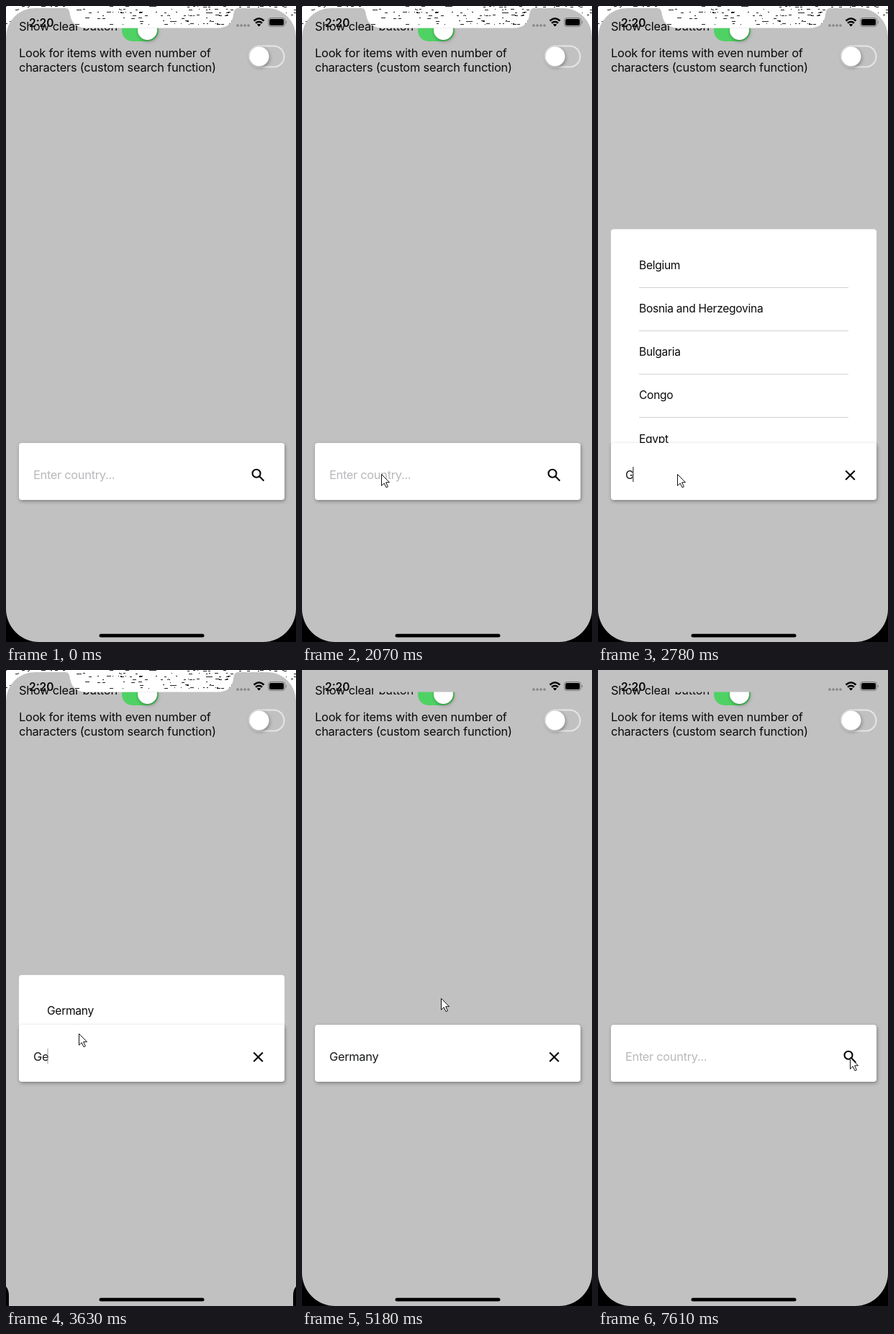
Write an HTML page that moves like this. It is 403 by 882 pixels and loops after 8 s.

```html
<!DOCTYPE html>
<html lang="en">
<head>
<meta charset="utf-8">
<title>Country autocomplete</title>
<style>
  html, body { margin: 0; width: 100%; height: 100%; overflow: hidden; background: #c1c1c1; }
  svg { display: block; width: 403px; height: 882px; }
  text { font: 16.4px Inter, sans-serif; letter-spacing: -.22px; fill: #0a0a0a; white-space: pre; }
  #value { letter-spacing: -.3px; }
  .row { font-size: 15.6px; letter-spacing: -.3px; }
  .clock { font-size: 15.5px; font-weight: 600; letter-spacing: 0; }
  .soft { filter: drop-shadow(1px 2px 2.5px rgba(0, 0, 0, .34)); }
</style>
</head>
<body>
<svg viewBox="0 0 403 882">
  <defs><clipPath id="bezelClip"><use href="#bezelShape"/></clipPath></defs>
  <rect width="403" height="882" fill="#c1c1c1"/>

  <text x="18" y="34">Show clear button</text>
  <rect x="161" y="19" width="51" height="30" rx="15" fill="#4fd264"/>
  <circle class="soft" cx="196.5" cy="33.5" r="13.5" fill="#fff"/>
  <rect x="99" width="219" height="30.5" fill="#c1c1c1"/>

  <text x="18" y="71">Look for items with even number of</text>
  <text x="18" y="91">characters (custom search function)</text>
  <rect x="338" y="55.5" width="48.5" height="29" rx="14.5" fill="none" stroke="#e6e6e6" stroke-width="2"/>
  <circle class="soft" cx="352" cy="70" r="13.5" fill="#fff"/>

  <g id="bezel">
    <path id="bezelShape" fill="#fff" d="M0 0H403V43A40 40 0 0 0 363 3H322Q317 3 316 12Q314 30.5 294 30.5H112Q92 30.5 89 12Q88 3 83 3H40A40 40 0 0 0 0 43Z"/>
    <path id="specks" clip-path="url(#bezelClip)" stroke="#222" fill="none"/>
  </g>

  <text class="clock" x="32" y="28.5">2:20</text>
  <path d="M322 27h17" stroke="#858585" stroke-width="3.6" stroke-linecap="round" stroke-dasharray="0 5"/>
  <g fill="none" stroke="#080808" stroke-width="2.5">
    <path d="M344.5 20.5Q351.5 14 358.5 20.5"/>
    <path d="M347 23.7Q351.5 19.8 356 23.7"/>
  </g>
  <path d="M348.8 25.8Q351.5 23.6 354.2 25.8L351.5 28.6Z"/>
  <rect x="364.5" y="16.5" width="23" height="12" rx="3.5" fill="none" stroke="#777"/>
  <rect x="366" y="18" width="20" height="9" rx="2"/>
  <path d="M389 20.5q2 2 0 4z" fill="#666"/>

  <g id="list"></g>

  <g id="field">
    <rect class="soft" x="18" width="369" height="79" rx="4" fill="#fff"/>
    <text id="value" x="38" y="49.5"></text>
    <rect id="caret" y="33" width="2" height="21" fill="#858585"/>
    <rect id="press" x="338" y="32.5" width="24" height="24" fill="#ddd"/>
    <path id="icon" transform="translate(338.5 32.7)" fill="none" stroke="#080808" stroke-width="2.1"/>
  </g>

  <path id="corner"/>
  <use href="#corner" transform="matrix(-1 0 0 1 403 0)"/>
  <rect x="129.5" y="870.8" width="146" height="4.8" rx="2.4"/>
  <path id="cursor" d="M.5 .5V16.2L4.2 12.7 7 18.7 9.4 17.7 6.7 11.7H11.5Z" fill="#fff" stroke="#111"/>
</svg>

<script>
const LOOP = 8000, TICK = 76;
const FOCUS = 1140, TYPE_G = 2150, TYPE_E = 2850, PICK = 4170, CLOSE = 4245, FILL = 4400, PRESS = 6760, CLEAR = 7610;

const $ = id => document.getElementById(id);
const show = (id, on) => $(id).style.display = on ? '' : 'none';
const clamp = v => Math.max(0, Math.min(1, v));

const SEARCH = 'M15 9.5a5.5 5.5 0 1 0-11 0a5.5 5.5 0 1 0 11 0M13.4 13.4L19.8 19.8';
const CROSS = 'M5.7 5.7L18.3 18.3M18.3 5.7L5.7 18.3';
const ROUND_CORNER = 'M0 836A46 46 0 0 0 46 882H0Z';
const SLIVER_CORNER = 'M0 855Q4 859 4 868V882H0Z';

// Each move starts where the previous one ends; bow bends the path sideways.
const MOVES = [
  { start: 380, end: 910, x: 110, y: 649, bow: 0 },
  { start: 3310, end: 4020, x: 96, y: 473, bow: -.05 },
  { start: 5030, end: 5800, x: 328, y: 504, bow: .27 },
  { start: 5880, end: 6120, x: 356, y: 537, bow: -.3 },
  { start: 6290, end: 6450, x: 350, y: 537, bow: 0 }
];
const ENTRY = { x: 276, y: 792 };

function cursorAt(t) {
  const index = MOVES.filter(m => m.start <= t).length - 1;
  if (index < 0) return null;
  const to = MOVES[index], from = MOVES[index - 1] || ENTRY;
  const ticks = Math.floor((t - to.start) / TICK) + 1;
  const p = clamp(ticks * TICK / (to.end - to.start + TICK));
  const e = 1 - (1 - p) ** 2.6;
  const dx = to.x - from.x, dy = to.y - from.y;
  const bend = 2 * e * (1 - e) * to.bow;
  return [from.x + dx * e + dy * bend, from.y + dy * e - dx * bend];
}

function caretAt(t) {
  if (t < FOCUS || t >= FILL) return 0;
  const age = t < TYPE_G ? t - FOCUS : Math.max(250, t - (t < TYPE_E ? TYPE_G : TYPE_E));
  return clamp(.8 - 2 * Math.cos(age * 2 * Math.PI / 1000));
}

function typedAt(t) {
  if (t < TYPE_G || t >= CLEAR) return '';
  return t < TYPE_E ? 'G' : t < FILL ? 'Ge' : 'Germany';
}

function listMarkup(top, bottom, names) {
  const rows = names.map((name, i) => {
    const y = top + 55 + i * 60.3;
    const line = i < names.length - 1
      ? `<path d="M57 ${Math.round(y + 25) + .5}H348" stroke="#d2d2d2"/>` : '';
    return `<text class="row" x="57" y="${y}">${name}</text>${line}`;
  }).join('');
  return `<rect x="18" y="${top}" width="369" height="${bottom - top + 4}" rx="4" fill="#fff"/>${rows}`;
}

let shownTyped;
function setTyped(typed) {
  if (typed === shownTyped) return;
  shownTyped = typed;
  $('value').textContent = typed || 'Enter country...';
  $('value').style.fill = typed ? '#161a16' : '#b9b9bd';
  $('icon').setAttribute('d', typed ? CROSS : SEARCH);
  $('caret').setAttribute('x', typed ? 36 + $('value').getComputedTextLength() - $('value').textContent.length * .1 : 37);
  $('list').innerHTML = typed === 'G'
    ? listMarkup(309.5, 606, ['Belgium', 'Bosnia and Herzegovina', 'Bulgaria', 'Congo', 'Egypt'])
    : typed === 'Ge' ? listMarkup(423, 492, ['Germany']) : '';
}

function render(t) {
  setTyped(typedAt(t));
  $('field').setAttribute('transform', `translate(0 ${t < TYPE_E ? 606 : 492})`);
  $('corner').setAttribute('d', t >= TYPE_E && t < FILL ? SLIVER_CORNER : ROUND_CORNER);
  $('caret').style.opacity = caretAt(t);
  show('list', t < CLOSE);
  const row = $('list').querySelector('text');
  if (row) row.style.opacity = t < PICK ? 1 : .4;
  show('bezel', t < FILL);
  show('press', t >= PRESS && t < PRESS + TICK);
  const at = cursorAt(t);
  show('cursor', at);
  if (at) $('cursor').setAttribute('transform', `translate(${at.map(Math.round)})`);
}

function drawSpecks() {
  let seed = 7, d = '';
  const random = () => (seed = seed * 16807 % 2147483647) / 2147483647;
  for (let i = 0; i < 200; i++) {
    const x = Math.floor(random() * 403);
    const y = Math.floor(random() * 7) * 4 + Math.floor(random() * 2) + .5;
    d += `M${x} ${y}h${1 + Math.floor(random() * 5)}`;
  }
  $('specks').setAttribute('d', d);
}

drawSpecks();
const begin = performance.now();
function frame() {
  render((performance.now() - begin) % LOOP);
  requestAnimationFrame(frame);
}
frame();
</script>
</body>
</html>
```
